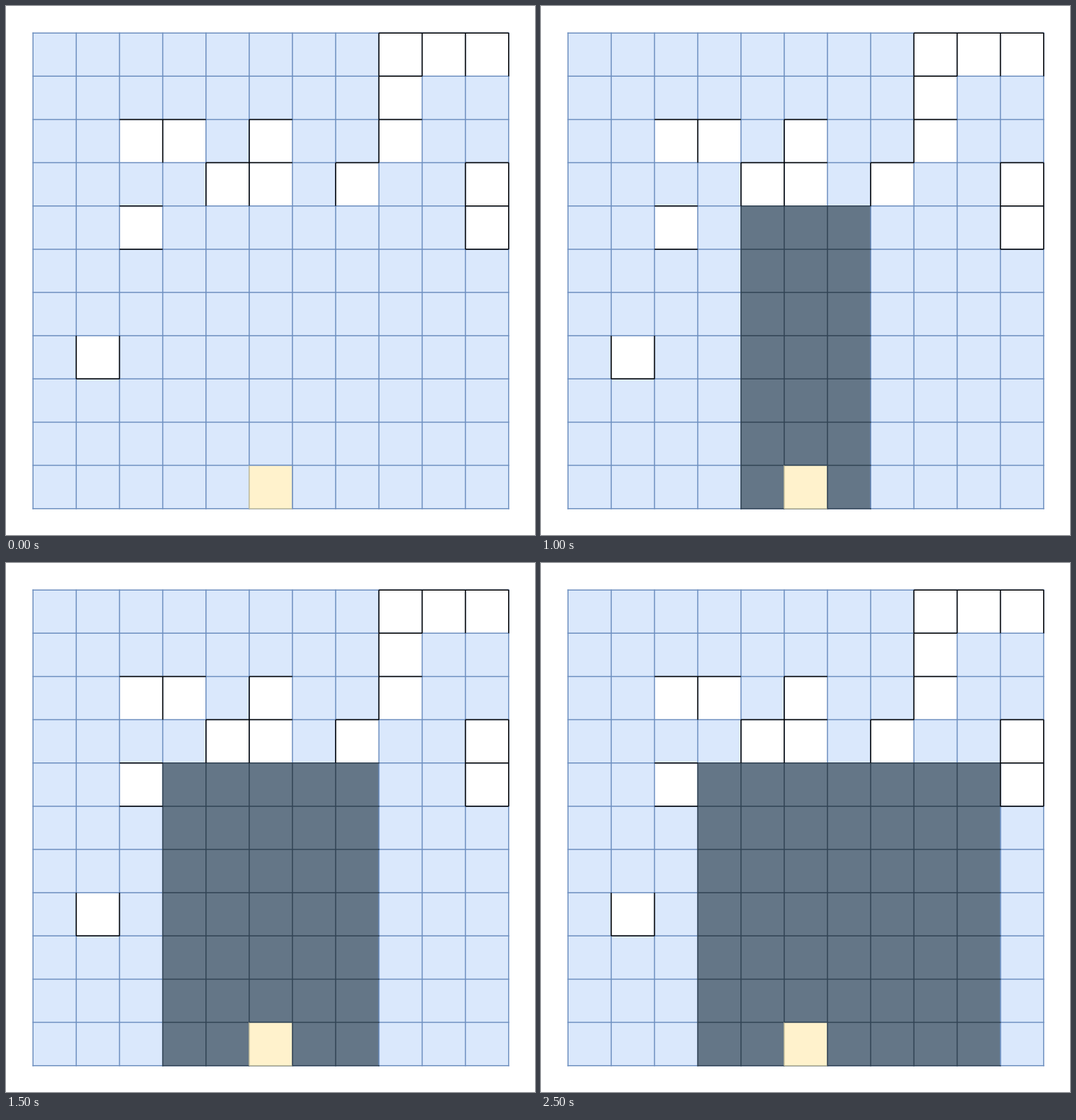
An HTML page with a canvas for the animation above (3 s loop, 748x748 px).

```html
<!DOCTYPE html>
<html lang="en">
<head>
<meta charset="utf-8">
<style>
  html, body { margin: 0; width: 100%; height: 100%; overflow: hidden; background: #fff; }
  canvas { display: block; }
</style>
</head>
<body>
<canvas width="748" height="748"></canvas>
<script>
const ctx = document.querySelector('canvas').getContext('2d');
const COUNT = 11, START = 38.2, CELL = 61.14, STEP = 500;
const COLORS = {
  floor: '#dae8fc', grid: '#6c8ebf',
  wall: '#fff', ink: '#000',
  seen: '#647687', seenLine: '#314354',
  player: '#fff2cc', playerLine: '#c5bf9e'
};

// column, row, edges drawn in black
const walls = [
  [8, 0, 'tlrb'], [9, 0, 'tr'], [10, 0, 'tr'],
  [8, 1, 'lb'], [8, 2, 'l'],
  [2, 2, 'tr'], [3, 2, 't'], [5, 2, 'tlb'],
  [4, 3, 'tlr'], [5, 3, ''], [7, 3, 'tl'],
  [10, 3, 'tlrb'], [10, 4, 'lrb'],
  [2, 4, 'tb'], [1, 7, 'lrb']
];

// first column, last column, last row of the visible area
const views = [null, [5, 5, 9], [4, 6, 10], [3, 7, 10], [3, 8, 10], [3, 9, 10]];
const TOP = 4;

const at = i => START + i * CELL;

function fill(c, r, w, h, color) {
  ctx.fillStyle = color;
  ctx.fillRect(at(c), at(r), w * CELL, h * CELL);
}

function line(c1, r1, c2, r2, color) {
  ctx.strokeStyle = color;
  ctx.beginPath();
  ctx.moveTo(at(c1), at(r1));
  ctx.lineTo(at(c2), at(r2));
  ctx.stroke();
}

function edges(c, r, sides, color) {
  if (sides.includes('t')) line(c, r, c + 1, r, color);
  if (sides.includes('b')) line(c, r + 1, c + 1, r + 1, color);
  if (sides.includes('l')) line(c, r, c, r + 1, color);
  if (sides.includes('r')) line(c + 1, r, c + 1, r + 1, color);
}

function drawView([first, last, bottom]) {
  const right = last + 1, end = bottom + 1;
  fill(first, TOP, right - first, end - TOP, COLORS.seen);
  line(right, TOP, right, end, COLORS.grid);
  for (let c = first; c < right; c++) line(c, TOP, c, end, COLORS.seenLine);
  for (let r = TOP; r <= end; r++) line(first, r, right, r, COLORS.seenLine);
}

function draw(step) {
  ctx.fillStyle = '#fff';
  ctx.fillRect(0, 0, 748, 748);
  ctx.lineWidth = 1.5;
  ctx.lineCap = 'square';

  fill(0, 0, COUNT, COUNT, COLORS.floor);
  for (const [c, r] of walls) fill(c, r, 1, 1, COLORS.wall);
  for (let i = 0; i <= COUNT; i++) {
    line(i, 0, i, COUNT, COLORS.grid);
    line(0, i, COUNT, i, COLORS.grid);
  }

  const view = views[step];
  if (view) drawView(view);

  ctx.lineCap = 'butt';
  for (const [c, r, sides] of walls) edges(c, r, sides, COLORS.ink);

  fill(5, 10, 1, 1, COLORS.player);
  edges(5, 10, 'lb', COLORS.playerLine);
  edges(5, 10, 't', view ? COLORS.seenLine : COLORS.grid);
  edges(5, 10, 'r', step > 1 ? COLORS.seenLine : COLORS.grid);
}

let shown = -1;
function tick() {
  const step = Math.floor(performance.now() / STEP) % views.length;
  if (step !== shown) draw(shown = step);
  requestAnimationFrame(tick);
}
tick();
</script>
</body>
</html>
```
